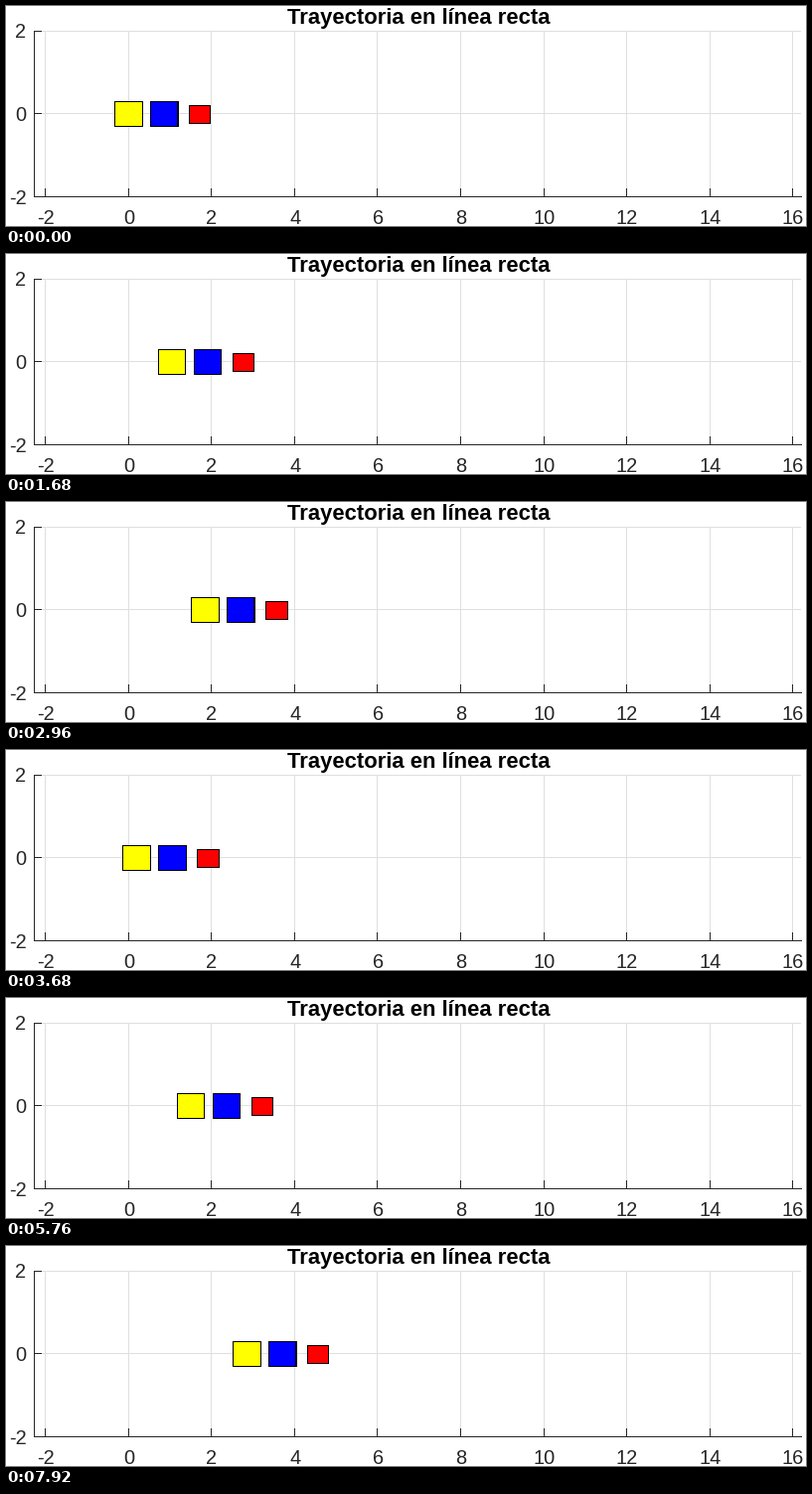
A matplotlib script that plays this animation: 805x222 px, repeating every 8 s.

```python
from math import floor

import matplotlib.pyplot as plt
from matplotlib.animation import FuncAnimation
from matplotlib.patches import Rectangle

W, H, DPI = 805, 222, 100
FRAMES, INTERVAL = 100, 80
UNIT = 41.79            # pixels per data unit
STEP = 0.05 * UNIT      # travel per frame
RUN = 42                # frames before the train restarts
INK, GRID = "#262626", "#dfdfdf"
LEFT, RIGHT, TOP, MIDDLE, BOTTOM = 28, 800, 25, 108, 192

fig = plt.figure(figsize=(W / DPI, H / DPI), dpi=DPI, facecolor="white")
ax = fig.add_axes([0, 0, 1, 1])
ax.set_xlim(0, W)
ax.set_ylim(H, 0)
ax.axis("off")


def block(x, y, w, h, color, z):
    """Filled rectangle on whole pixels."""
    patch = Rectangle((x, y), w, h, facecolor=color, linewidth=0,
                      antialiased=False, zorder=z)
    return ax.add_patch(patch)


def label(x, y, text, size=20, **style):
    style = {"color": INK, "ha": "center", **style}
    ax.text(x, y, text, fontsize=size * 72 / DPI, va="baseline",
            family="Liberation Sans", **style)


def draw_axes():
    for value in range(-2, 17, 2):
        x = 123.18 + value * UNIT
        col = floor(x)
        block(col, TOP, 1, BOTTOM - TOP, GRID, 1)
        block(col, BOTTOM - 8, 1, 8, INK, 2)
        label(x + 0.3, 220, str(value))
    for value, row in ((2, TOP), (0, MIDDLE), (-2, BOTTOM)):
        block(LEFT, row, RIGHT - LEFT, 1, GRID, 1)
        block(LEFT, row, 8, 1, INK, 2)
        label(20.5, row + 7.5, str(value), ha="right")
    block(LEFT, BOTTOM, RIGHT - LEFT + 1, 1, INK, 2)
    block(LEFT, TOP, 1, BOTTOM - TOP + 1, INK, 2)
    label(415, 18, "Trayectoria en línea recta", 22,
          color="black", weight="bold")


class Wagon:
    """Box whose near and far right edges may land on neighbouring pixels."""

    def __init__(self, color, left, near, far, top, bottom):
        self.edges = left, near, far
        self.outline = block(0, top, 1, bottom - top + 1, "black", 3)
        self.fill = block(0, top + 1, 1, bottom - top - 1, color, 4)

    def move(self, shift):
        left, near, far = (floor(edge + shift) for edge in self.edges)
        self.outline.set_x(left)
        self.outline.set_width(far - left + 1)
        self.fill.set_x(left + 1)
        self.fill.set_width(near - left - 1)


draw_axes()
wagons = [
    Wagon("#ffff00", 109.5, 137.05, 137.05, 96, 121),
    Wagon("#0000ff", 145.5, 172.65, 173.05, 96, 121),
    Wagon("#ff0000", 184.5, 205.7, 205.82, 100, 118),
]


def update(frame):
    for wagon in wagons:
        wagon.move(frame % FRAMES * STEP if frame < RUN
                   else (frame - RUN) * STEP)
    return [part for w in wagons for part in (w.outline, w.fill)]


anim = FuncAnimation(fig, update, frames=FRAMES, interval=INTERVAL,
                     repeat=True, repeat_delay=0, blit=False)
plt.show()
```
